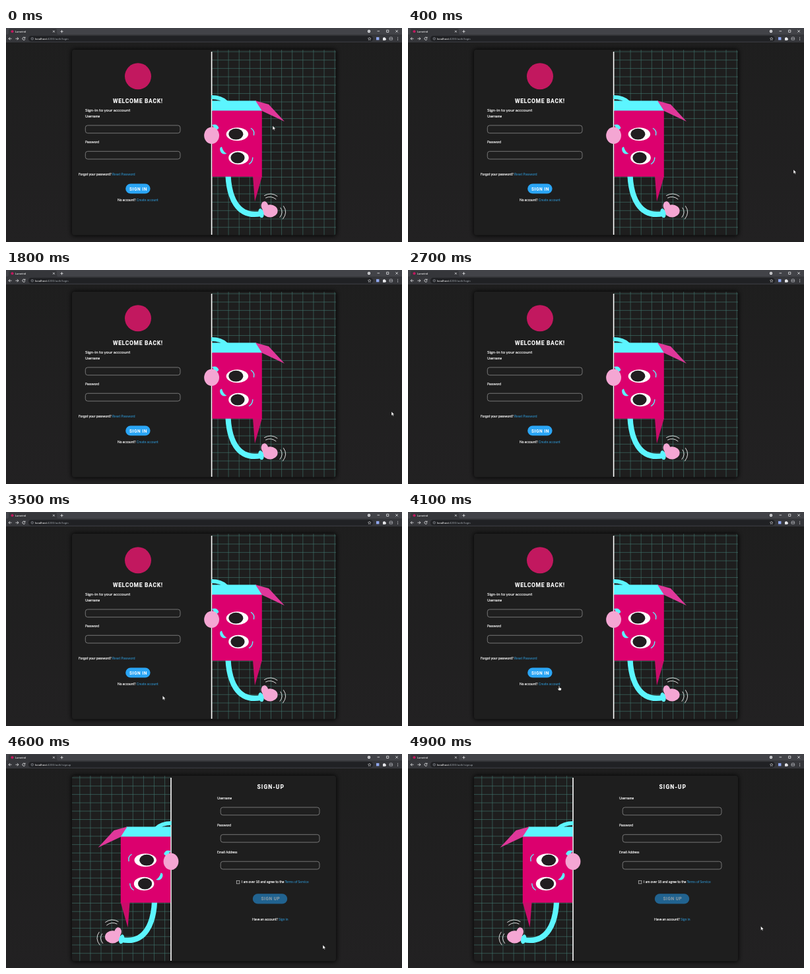
These frames come from a looping animation (600 by 325 pixels, 5000 ms). An HTML page:

```html
<!DOCTYPE html>
<html lang="en">
<head>
<meta charset="utf-8">
<title>Sign in</title>
<style>
  html, body { margin: 0; width: 100%; height: 100%; overflow: hidden; background: #1e1e1e; }
  svg { display: block; width: 600px; height: 325px; }
  text { font: 5px Lato, sans-serif; fill: #fff; stroke: #fff; stroke-width: .13; white-space: pre; }
  .lead { font-size: 6.45px; }
  .link { fill: #2f9fe0; stroke: none; }
  .title { font: 700 8.5px Roboto, sans-serif; }
  .btn { font: 700 6.6px Roboto, sans-serif; letter-spacing: .5px; stroke: none; }
  .ui { font: 4.4px Roboto, sans-serif; stroke: none; }
  .dim { fill: #9aa0a6; }
  .field { fill: #1f1f1f; stroke: #929292; stroke-width: .75; }
  .icon { fill: none; stroke: #e6e7ea; stroke-width: .8; }
  .cyan { fill: #5cf5ff; }
  .pink { fill: #f4a6d3; }
  .line { fill: none; stroke: #5cf5ff; stroke-width: 1.4; stroke-linecap: round; }
  .wave { fill: none; stroke: #f2f2f2; stroke-width: .9; stroke-linecap: round; }
</style>
</head>
<body>
<svg viewBox="0 0 600 325" xmlns="http://www.w3.org/2000/svg">
  <defs>
    <linearGradient id="bg" x2="0" y2="1">
      <stop stop-color="#1e1e1e"/><stop offset="1" stop-color="#222122"/>
    </linearGradient>
    <filter id="shade" x="-10%" y="-10%" width="120%" height="120%">
      <feGaussianBlur stdDeviation="3"/>
    </filter>
    <clipPath id="card"><rect x="100" y="33" width="400" height="281.5" rx="4"/></clipPath>

    <g id="art">
      <path id="grid" fill="none" stroke="#42776f" stroke-width=".6"/>
      <path d="M311.6 36V314" stroke="#fff" stroke-width="1.6"/>
      <path d="M311 105Q326 105 334 113" fill="none" stroke="#5cf5ff" stroke-width="6"/>
      <path class="cyan" d="M312 110.5H379L389 126H312Z"/>
      <path d="M378 110.5L398 116L422 142L388 126Z" fill="#e0379a"/>
      <path d="M374 225H388L377 263.5Z" fill="#ca0c6a"/>
      <path d="M336.5 224C338 256 350 289 386 282" fill="none" stroke="#5cf5ff" stroke-width="8.2"/>
      <path d="M312.4 125.5H387.8V225.8H312.4Z" fill="#dc006e"/>
      <path class="cyan" d="M312 147Q320.5 144.5 322.5 152L318 156Z"/>
      <path class="cyan" d="M327 180.5Q323 181 324.5 186.5Q327 193 334.5 191Q329 188 327 180.5Z"/>
      <g fill="#fff">
        <ellipse cx="350.4" cy="161.2" rx="16.7" ry="10"/>
        <ellipse cx="352.5" cy="197" rx="15.3" ry="10.3"/>
      </g>
      <g fill="#211e20">
        <ellipse cx="348.4" cy="161.2" rx="11" ry="8.4"/>
        <ellipse cx="351" cy="197" rx="10.6" ry="8.6"/>
      </g>
      <path class="line" d="M371.5 152.5Q377 156 375.5 162.5M373.8 197Q373.5 203.5 368.5 206.5"/>
      <ellipse class="pink" cx="311.6" cy="163.3" rx="11.4" ry="12.8"/>
      <ellipse class="pink" cx="400" cy="277.8" rx="11.6" ry="9.6"/>
      <ellipse class="pink" cx="392" cy="270.5" rx="5.3" ry="7.2" transform="rotate(-10 392 270.5)"/>
      <ellipse class="cyan" cx="386.5" cy="281.3" rx="3.9" ry="7.2" transform="rotate(-14 386.5 281.3)"/>
      <path class="wave" d="M391.5 254.5Q401.5 248.5 411 255.5M393.5 258Q401.5 254 409 260"/>
      <path class="wave" d="M416 273Q421 280 415 287.5M420.5 270.5Q427.5 280 419.5 290"/>
    </g>
  </defs>

  <rect width="600" height="325" fill="url(#bg)"/>
  <rect x="99" y="32" width="402" height="284" rx="5" filter="url(#shade)" opacity=".8"/>
  <rect x="100" y="33" width="400" height="281.5" rx="4" fill="#1e1e1e"/>

  <!-- browser bar -->
  <rect width="600" height="10.5" fill="#424348"/>
  <path d="M2 10.5Q4 10 4 7V3Q4 1 6 1H75Q77 1 77 3V7Q77 10 79 10.5Z" fill="#35363a"/>
  <rect y="10.2" width="600" height="11.8" fill="#35363a"/>
  <rect x="34" y="11.8" width="522" height="8.8" rx="4.4" fill="#202124"/>
  <circle cx="9.5" cy="5.3" r="2" fill="#c2185f"/>
  <text class="ui" x="13.7" y="6.9" style="font-size:4.2px">Lumetrid</text>
  <path class="icon" d="M71 3.9l2.8 2.8m0-2.8l-2.8 2.8M84.5 3.2v4.2m-2.1-2.1h4.2"/>
  <path class="icon" d="M8.5 16.2H4m2.1-2.1L4 16.2l2.1 2.1M14.5 16.2H19m-2.1-2.1l2.1 2.1-2.1 2.1"/>
  <path class="icon" d="M28.6 14.8A2.1 2.1 0 1 0 29 16.8M29 13.6V15.3H27.2"/>
  <g class="icon" style="stroke:#9aa0a6;stroke-width:.6"><circle cx="39.8" cy="16.2" r="1.8"/><path d="M39.8 15.9v1.2m0-2.1v.5"/></g>
  <text class="ui" x="44" y="17.8">localhost<tspan class="dim" id="url"></tspan></text>
  <circle cx="550" cy="5" r="2.2" fill="#e6e7ea"/>
  <path d="M549 4.5h2l-1 1.3z" fill="#202124"/>
  <path class="icon" d="M562.5 4.8h3.6M576.6 3.2h3.2v3.2h-3.2zM590.4 3.2l3.4 3.4m0-3.4l-3.4 3.4"/>
  <path class="icon" style="stroke-width:.5" d="M550.7 14l.7 1.5 1.6.2-1.2 1.1.3 1.6-1.4-.8-1.4.8.3-1.6-1.2-1.1 1.6-.2z"/>
  <rect x="561" y="13.9" width="4.4" height="4.4" fill="#8fa6ee"/>
  <path d="M571 14.8h1.2a.9.9 0 0 1 1.8 0h1.2v1.2a.9.9 0 0 1 0 1.8v1h-4.2z" fill="#e6e7ea"/>
  <circle cx="583.3" cy="16.2" r="2.9" fill="#85878c"/>
  <path d="M581.3 18.3q2-3.2 4 0zM582.3 15.3a1 1 0 1 0 2 0a1 1 0 1 0-2 0" fill="#3b3c40"/>
  <g fill="#e6e7ea"><circle cx="593.6" cy="14.3" r=".55"/><circle cx="593.6" cy="16.2" r=".55"/><circle cx="593.6" cy="18.1" r=".55"/></g>

  <g id="login">
    <g clip-path="url(#card)"><use href="#art"/></g>
    <circle cx="200" cy="73.3" r="20" fill="#c2185f"/>
    <text class="title" x="162" y="113.6" letter-spacing=".7">WELCOME BACK!</text>
    <text class="lead" x="120" y="127.3">Sign-in to your acccount</text>
    <text x="120" y="135.6">Username</text>
    <rect class="field" x="120.3" y="147.9" width="143.7" height="11.8" rx="3.5"/>
    <text x="120" y="175">Password</text>
    <rect class="field" x="120.3" y="187.3" width="143.7" height="11.8" rx="3.5"/>
    <text x="110" y="224.2">Forgot your password? <tspan class="link">Reset Password</tspan></text>
    <rect x="181.2" y="236.4" width="37.4" height="15.2" rx="7.6" fill="#2aa5f5"/>
    <text class="btn" x="187" y="246.5">SIGN IN</text>
    <text x="169" y="263.4">No account? <tspan class="link">Create account</tspan></text>
  </g>

  <g id="signup">
    <g clip-path="url(#card)"><use href="#art" transform="translate(561.6) scale(-1 1)"/></g>
    <text class="title" x="380.5" y="53" letter-spacing="1.1">SIGN-UP</text>
    <text x="320" y="68.7">Username</text>
    <rect class="field" x="325.2" y="81" width="149.8" height="11.8" rx="3.5"/>
    <text x="320" y="109.6">Password</text>
    <rect class="field" x="325.2" y="122.3" width="149.8" height="11.8" rx="3.5"/>
    <text x="320" y="150.8">Email Address</text>
    <rect class="field" x="325.2" y="163.2" width="149.8" height="11.8" rx="3.5"/>
    <rect x="349.3" y="192.3" width="4.6" height="4.6" fill="none" stroke="#d0d0d0" stroke-width=".7"/>
    <text x="357" y="196.3">I am over 18 and agree to the <tspan class="link">Terms of Service</tspan></text>
    <rect x="373.8" y="212.2" width="52.4" height="15.4" rx="7.7" fill="#216390"/>
    <text class="btn" x="386.5" y="222.3" style="fill:#8f9da6">SIGN UP</text>
    <text x="373" y="253.4">Have an account? <tspan class="link">Sign in</tspan></text>
  </g>

  <g id="cursor" fill="#fff" stroke="#111" stroke-width=".4">
    <path id="arrow" d="M0 0V6.2L1.5 4.9L2.5 7L3.5 6.5L2.5 4.5H4.5Z"/>
    <path id="hand" d="M-.6 .5Q0-.4 .6 .5V2.8L2.9 3.4Q3.5 3.6 3.4 4.6L2.8 7H-.6L-2.2 4.4Q-1.8 3.5-.6 4.4Z"/>
  </g>
</svg>
<script>
  const el = id => document.getElementById(id);
  const show = (id, on) => el(id).style.display = on ? '' : 'none';
  const LOOP = 5000, STEP = 100;

  let d = '';
  for (let x = 321; x < 505; x += 16.1) d += `M${x} 33V315`;
  for (let y = 36; y < 315; y += 12.7) d += `M312 ${y}H500`;
  el('grid').setAttribute('d', d);

  // pointer stops: time, x, y
  const legs = [
    [[0, 404, 148.5], [200, 500, 196], [400, 584, 215], [1800, 584, 215], [2300, 531, 283], [2400, 505, 292]],
    [[2900, 376, 317], [3400, 240, 284], [3800, 229, 264], [4100, 229, 264], [4200, 227.5, 264],
     [4300, 227.5, 264], [4600, 480, 290], [4900, 534.5, 261.5]]
  ];

  function pointer(t) {
    const leg = legs.find(l => t >= l[0][0] && t <= l[l.length - 1][0]);
    if (!leg) return null;
    const i = Math.max(1, leg.findIndex(k => k[0] >= t));
    const [a, b] = [leg[i - 1], leg[i]];
    const p = (t - a[0]) / (b[0] - a[0]);
    return [a[1] + (b[1] - a[1]) * p, a[2] + (b[2] - a[2]) * p];
  }

  function draw(now) {
    const t = Math.floor(now % LOOP / STEP) * STEP;
    const joined = t >= 4200;
    show('login', !joined);
    show('signup', joined);
    el('url').textContent = ':4200/auth/' + (joined ? 'signup' : 'login');

    const pos = pointer(t);
    show('cursor', pos);
    if (pos) el('cursor').setAttribute('transform', `translate(${pos})`);
    const link = t >= 3800 && !joined;
    show('arrow', !link);
    show('hand', link);
  }

  const start = performance.now();
  function tick() {
    draw(performance.now() - start);
    requestAnimationFrame(tick);
  }
  tick();
</script>
</body>
</html>
```
